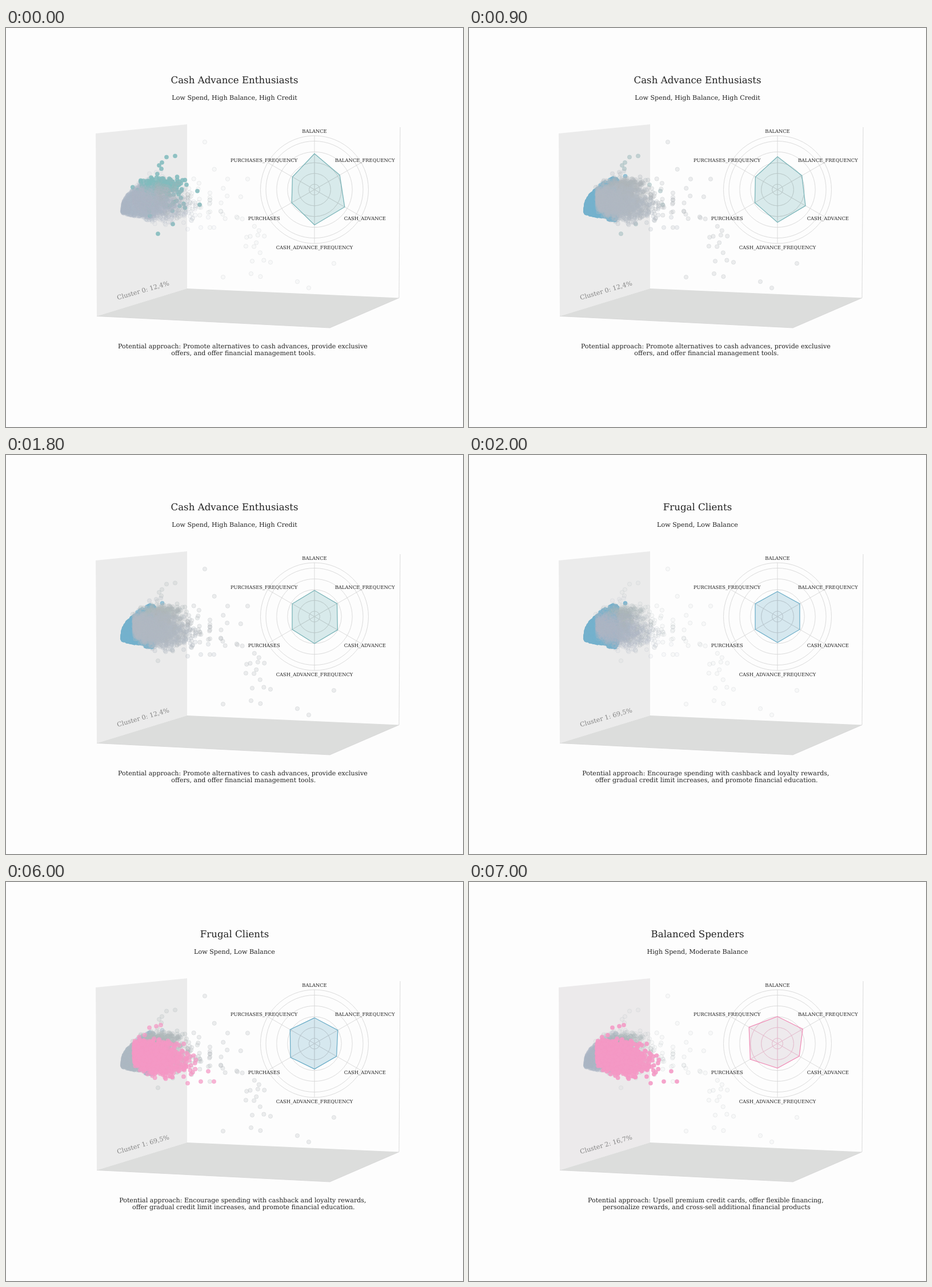
Animation, 800 px wide and 700 px high, one loop 8000 ms. Source, as an HTML page with a canvas:

```html
<!DOCTYPE html>
<html lang="en">
<head>
<meta charset="utf-8">
<title>Customer clusters</title>
<style>
  html, body { margin: 0; width: 100%; height: 100%; overflow: hidden; background: #fdfdfd; }
  canvas, svg { position: absolute; left: 0; top: 0; width: 100%; height: 100%; display: block; }
  text { font-family: "DejaVu Serif", serif; font-size: 11.11px; fill: #222; text-anchor: middle; text-rendering: geometricPrecision; }
  #title { font-size: 16.67px; }
  #labels text { font-size: 8.33px; }
  #grid { fill: none; stroke-width: .8; }
</style>
</head>
<body>
<canvas id="room" width="800" height="700"></canvas>
<svg viewBox="0 0 800 700">
  <defs>
    <g id="grid"></g>
    <clipPath id="inside"><polygon id="mask"/></clipPath>
  </defs>
  <text id="title" x="400" y="96.5"></text>
  <text id="sub" x="400" y="126"></text>
  <text id="share" transform="translate(241 464) rotate(-16)" style="fill:#858585"></text>
  <text id="line1" x="414.4" y="561.7"></text>
  <text id="line2" x="415.8" y="574.2"></text>
  <use href="#grid" stroke="#d2d2d2"/>
  <polygon id="area" fill-opacity=".3"/>
  <use href="#grid" id="innerGrid" clip-path="url(#inside)"/>
  <polygon id="edge" fill="none" stroke-width="1.3"/>
  <g id="labels"></g>
</svg>
<script>
const $ = id => document.getElementById(id);
const ctx = $('room').getContext('2d');
const CX = 540, CY = 283.5, LOOP = 8000, STEP = 100, STEPS = 16;

// radii run clockwise from the top spoke
const scenes = [
  { group: 0, title: 'Cash Advance Enthusiasts', sub: 'Low Spend, High Balance, High Credit',
    share: 'Cluster 0: 12,4%',
    line1: 'Potential approach: Promote alternatives to cash advances, provide exclusive',
    line2: 'offers, and offer financial management tools.',
    radii: [63, 51, 61, 62, 46, 44.5],
    stroke: '#7ab4b8', fill: '#83bcbf', inner: '#bccaca' },
  { group: 1, title: 'Frugal Clients', sub: 'Low Spend, Low Balance',
    share: 'Cluster 1: 69,5%',
    line1: 'Potential approach: Encourage spending with cashback and loyalty rewards,',
    line2: 'offer gradual credit limit increases, and promote financial education.',
    radii: [44, 45, 45, 45.5, 45, 45],
    stroke: '#6fafc9', fill: '#7ab5cd', inner: '#b9c6cd' },
  { group: 2, title: 'Balanced Spenders', sub: 'High Spend, Moderate Balance',
    share: 'Cluster 2: 16,7%',
    line1: 'Potential approach: Upsell premium credit cards, offer flexible financing,',
    line2: 'personalize rewards, and cross-sell additional financial products',
    radii: [47.5, 51, 44, 43, 55, 57.5],
    stroke: '#f08fb8', fill: '#cbbec5', inner: '#eeb8cf' }
];

let seed = 11;
function rnd() {
  seed = (seed * 1664525 + 1013904223) >>> 0;
  return seed / 4294967296;
}
const gauss = () => (rnd() + rnd() + rnd() + rnd() - 2) * 1.73;
const cloud = (n, make) => Array.from({ length: n }, make);
const pairs = s => s.split(' ').map(p => p.split(',').map(Number));
const mix = (a, b, f) => a + (b - a) * f;
const clamp = x => Math.max(0, Math.min(1, x));

// leaf with its tip at the left; u runs along it, v from top to bottom
function leaf(u, v) {
  const top = 322 - 58 * Math.pow(u, .38), low = 323 + 11 * Math.sqrt(u);
  return [204 + 56 * u, mix(top, low, v)];
}

// fan that opens to the lower right
function fan() {
  const d = 38 * Math.abs(gauss());
  return [224 + d, 300 + .2 * d + (8 + 5 * clamp(d / 20)) * gauss()];
}

function haze() {
  const d = Math.min(95, -24 * Math.log(1 - rnd()));
  return [262 + d, 298 + .1 * d + 15 * gauss()];
}

function stray() {
  const u = rnd();
  return [355 + 100 * u, 275 + 115 * u + 28 * gauss()];
}

// core: dense cloud; rim: scattered dots around it
const groups = [
  { core: cloud(220, () => [271 + 16 * gauss(), 276 + 6 * gauss()])
      .concat(cloud(110, () => [270 + 18 * gauss(), 295 + 14 * gauss()])),
    rim: pairs('296,224.5 281,226.5 273,236 268,241 272,247 316,275 335,286 339,310 266,361 292,344'),
    lit: [130, 187, 189], grey: [176, 184, 188] },
  { core: cloud(1300, () => leaf(Math.pow(rnd(), 1.1), rnd())),
    rim: cloud(16, (_, i) => leaf(.45 + .5 * rnd(), i % 2 ? -.05 : 1.05)).concat([[273.5, 260]]),
    lit: [116, 177, 205], grey: [175, 184, 196] },
  { core: cloud(1250, fan),
    rim: pairs('251,255.5 263,253 271,251 354,332 364,350 341,350 318,353'),
    lit: [244, 152, 197], grey: [177, 185, 196] },
  { core: cloud(340, haze),
    rim: cloud(24, stray).concat(pairs('348,200 388,265 423,265 431,409 463,411 429,431 380,437 510,445 530,456 574,413')),
    grey: [176, 181, 184] }
];
const drawOrder = [1, 0, 3, 2];

// a look is [r, g, b, fill alpha, stroke alpha]
const blend = (a, b, f) => a.map((v, i) => mix(v, b[i], f));
const idle = g => [...g.grey, .07, .24];
const faded = g => [...g.grey, .23, .32];
const lit = (g, a) => [...g.lit, a, .55];

function dots(points, [r, g, b, fa, sa]) {
  const rgb = [r, g, b].map(Math.round).join();
  ctx.fillStyle = `rgba(${rgb},${fa})`;
  ctx.strokeStyle = `rgba(${rgb},${sa})`;
  ctx.lineWidth = .9;
  for (const [x, y] of points) {
    ctx.beginPath();
    ctx.arc(x, y, 3.6, 0, 7);
    ctx.fill();
    ctx.stroke();
  }
}

function path(points, fill, stroke) {
  ctx.beginPath();
  points.forEach(([x, y]) => ctx.lineTo(x, y));
  if (fill) { ctx.fillStyle = fill; ctx.fill(); }
  if (stroke) { ctx.strokeStyle = stroke; ctx.lineWidth = .9; ctx.stroke(); }
}

function drawRoom(index, k) {
  ctx.fillStyle = '#fdfdfd';
  ctx.fillRect(0, 0, 800, 700);
  path(pairs('157,185 317,169 317,457 159,505.5'), index === 2 ? '#eceaeb' : '#ebebeb');
  path(pairs('159,505.5 317,457 688,473.5 567,526'), '#dcdddc');
  path(pairs('159,505.5 567,526 688,473.5 690,174'), null, '#d6d6d6');

  const now = scenes[index].group, next = k ? scenes[index + 1].group : -1;
  for (const i of drawOrder) {
    const g = groups[i];
    let core = k ? faded(g) : idle(g), rim = core;
    if (i === now) {
      core = rim = lit(g, .88);
      if (k) {
        rim = blend(rim, faded(g), clamp(k / 9));
        core = blend(core, faded(g), clamp(.85 + k / 40));
      }
    } else if (i === next) {
      core = rim = blend(idle(g), lit(g, .72), clamp((k - 1) / 4));
    }
    dots(g.core, core);
    dots(g.rim, rim);
  }
}

const spoke = (i, r) => {
  const a = i * Math.PI / 3;
  return [CX + r * Math.sin(a), CY - r * Math.cos(a)];
};

function drawRadar(index, k) {
  const s = scenes[index];
  const radii = k ? blend(s.radii, scenes[index + 1].radii, (k - 1) / (STEPS - 1.5)) : s.radii;
  const points = radii.map((r, i) => spoke(i, r).map(v => v.toFixed(2))).join(' ');
  ['mask', 'area', 'edge'].forEach(id => $(id).setAttribute('points', points));
  $('area').setAttribute('fill', s.fill);
  $('edge').setAttribute('stroke', s.stroke);
  $('innerGrid').setAttribute('stroke', s.inner);
}

function buildRadar() {
  const circle = r => `<circle cx="${CX}" cy="${CY}" r="${r}"/>`;
  let grid = circle(94.5);
  for (let r = 9.45; r < 94; r += 18.9) grid += circle(r);
  for (let i = 0; i < 6; i++) grid += `<path d="M${CX} ${CY}L${spoke(i, 94.5)}"/>`;
  $('grid').innerHTML = grid;
  const names = ['BALANCE', 'BALANCE_FREQUENCY', 'CASH_ADVANCE', 'CASH_ADVANCE_FREQUENCY', 'PURCHASES', 'PURCHASES_FREQUENCY'];
  $('labels').innerHTML = names.map((name, i) => {
    const [x, y] = spoke(i, 102);
    return `<text x="${x}" y="${y + 2.8}">${name}</text>`;
  }).join('');
}

function stepAt(t, start) {
  const k = Math.floor((t - start) / STEP) + 1;
  return k > 0 && k < STEPS ? k : 0;
}

let shown = '';
function render(t) {
  const index = t < 2000 ? 0 : t < 7000 ? 1 : 2;
  const k = stepAt(t, 500) || stepAt(t, 5500);
  const key = index + ':' + k;
  if (key === shown) return;
  shown = key;
  for (const id of ['title', 'sub', 'share', 'line1', 'line2']) $(id).textContent = scenes[index][id];
  drawRoom(index, k);
  drawRadar(index, k);
}

buildRadar();
const start = performance.now();
function tick() {
  render((performance.now() - start) % LOOP);
  requestAnimationFrame(tick);
}
tick();
</script>
</body>
</html>
```
